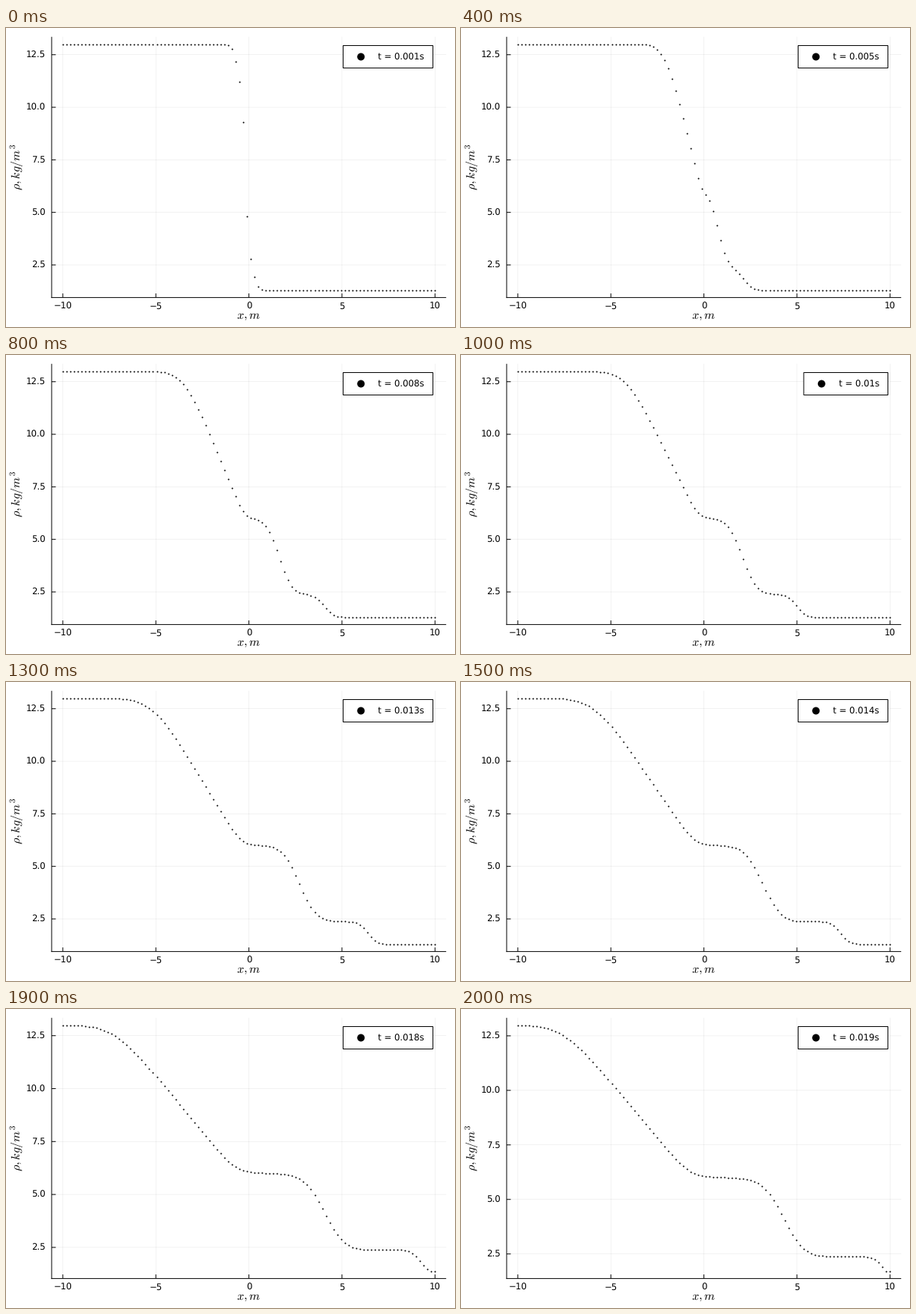
A matplotlib script for the animation above (2.1 s loop, 600 by 400 pixels).

```python
import math

import matplotlib.pyplot as plt
import numpy as np
from matplotlib.animation import FuncAnimation
from matplotlib.patches import Circle, Rectangle

W, H, DPI = 600, 400, 100
PX = 72 / DPI  # points per pixel
FRAMES, STEP = 21, 0.0009
LEFT, RIGHT, TOP, BOTTOM = 61.0, 588.2, 11.8, 360.6
PAD = 0.03 / 1.06

plt.rcParams["font.family"] = "DejaVu Sans"
plt.rcParams["mathtext.fontset"] = "cm"
plt.rcParams["text.hinting"] = "no_hinting"

x = np.linspace(-10, 10, 100)
erf = np.vectorize(math.erf)


def below(z):
    return 0.5 * (1 + erf(z / math.sqrt(2)))


def step(mid, s):
    """Smoothed step falling from 1 to 0 at mid."""
    return below((mid - x) / s)


def ramp(start, s):
    """Smoothed max(x - start, 0)."""
    z = (x - start) / s
    return s * (z * below(z) + np.exp(-z * z / 2) / math.sqrt(2 * math.pi))


def bump(mid, s):
    return np.exp(-(((x - mid) / s) ** 2) / 2)


def density(t):
    """Shock tube: rarefaction fan, contact and shock, each smeared."""
    shock = step(-0.21 + 523 * t, 0.405 * (1 - math.exp(-t / 0.001)))
    mid = -0.32 + 242 * t
    contact = step(mid, math.sqrt(40 * t - 0.02))
    shelf = step(0.35 * mid, 0.1 + 40 * t)

    centre = -0.165 - 212 * t
    width = 0.22 + 400 * t - 2600 * t * t
    head, tail = centre - width / 2, centre + width / 2
    fan = 1 - (ramp(head, math.sqrt(70 * t))
               - ramp(tail, 35 * t - 0.02)) / width

    rho = 1.3 + 1.08 * shock + 3.57 * contact + 0.08 * shelf + 6.97 * fan
    fade = math.exp(1 - t / STEP)
    rho += fade * (0.8 * bump(centre, 0.14) + 0.48 * bump(0.11, 0.13))
    rho[0], rho[-1] = rho[1], rho[-2]
    return rho


def to_px(v, lo, hi, a, b):
    pad = PAD * (b - a)
    return a + pad + (v - lo) / (hi - lo) * (b - a - 2 * pad)


fig = plt.figure(figsize=(W / DPI, H / DPI), dpi=DPI, facecolor="white")
ax = fig.add_axes([0, 0, 1, 1])
ax.set(xlim=(0, W), ylim=(H, 0))
ax.axis("off")


def line(xs, ys, **kw):
    style = dict(color="black", lw=PX, solid_capstyle="butt", snap=False)
    return ax.plot(xs, ys, **{**style, **kw})[0]


def label(px, py, s, size=11.7, **kw):
    return ax.text(px, py, s, fontsize=size * PX, va="baseline", **kw)


GRID = dict(alpha=0.1, lw=0.5 * PX, zorder=1)

for v in (-10, -5, 0, 5, 10):
    px = to_px(v, -10, 10, LEFT, RIGHT)
    line([px, px], [TOP, BOTTOM], **GRID)
    line([px, px], [BOTTOM, BOTTOM - 5.5])
    label(px, 375.4, str(v).replace("-", "\u2212"), ha="center")

y_ticks = []
for v in (2.5, 5.0, 7.5, 10.0, 12.5):
    y_ticks.append((v,
                    line([LEFT, RIGHT], [0, 0], **GRID),
                    line([LEFT, LEFT + 5.5], [0, 0]),
                    label(53.2, 0, f"{v:.1f}", ha="right")))

line([LEFT, LEFT], [TOP, BOTTOM + 0.5])
line([LEFT - 0.5, RIGHT], [BOTTOM, BOTTOM])
label(324.4, 389, "$x, m$", 16.2, ha="center")
label(18.8, 186, r"$\rho, kg/m^3$", 16.2, ha="center",
      rotation=90, rotation_mode="anchor")

dots = line(to_px(x, -10, 10, LEFT, RIGHT), x * 0, ls="none", marker="o",
            ms=2 * PX, mew=0, zorder=3)

box = ax.add_patch(Rectangle((450.5, 23.5), 120, 30, fc="white", ec="black",
                             lw=PX, snap=False, zorder=4))
key = ax.add_patch(Circle((474.3, 38.5), 5, fc="black", lw=0, zorder=5))
clock = label(497.4, 43, "", zorder=5)


def update(i):
    t = STEP * (i + 1)
    rho = density(t)
    lo, hi = rho.min(), rho.max()
    dots.set_ydata(to_px(rho, lo, hi, BOTTOM, TOP))
    for v, grid, tick, text in y_ticks:
        py = to_px(v, lo, hi, BOTTOM, TOP)
        grid.set_ydata([py, py])
        tick.set_ydata([py, py])
        text.set_y(py + 3.9)

    seconds = math.floor(t * 1000 + 0.5 + 1e-6) / 1000
    shift = 7.5 * (5 - len(str(seconds)))
    clock.set_text(f"t = {seconds}s")
    clock.set_x(497.4 + shift)
    key.center = (474.3 + shift, 38.5)
    box.set_x(450.5 + shift)
    box.set_width(120 - shift)
    return []


anim = FuncAnimation(fig, update, frames=FRAMES, interval=100,
                     repeat=True, repeat_delay=0, init_func=lambda: update(0))
plt.show()
```
